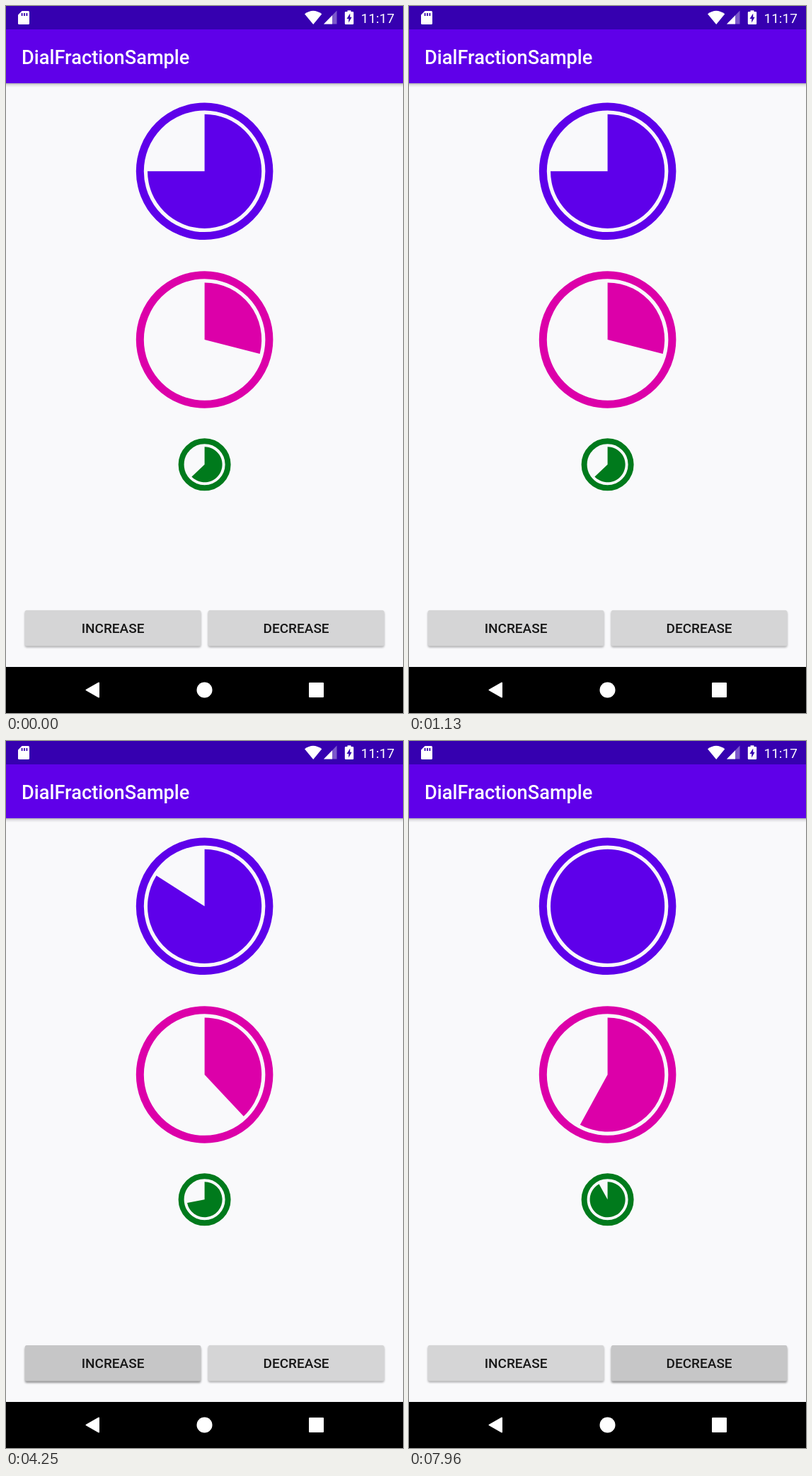
Write an HTML page that moves like this. It is 561 px wide and 998 px high and loops after 8 s.

```html
<!DOCTYPE html>
<html lang="en">
<head>
<meta charset="utf-8">
<title>Pie progress</title>
<style>
  html, body { margin: 0; width: 100%; height: 100%; overflow: hidden; background: #f9f9fb; }
  svg { display: block; width: 561px; height: 998px; }
  text { font-family: Roboto, sans-serif; font-weight: 500; }
  .label { font-size: 19px; fill: #171717; text-anchor: middle; }
</style>
</head>
<body>
<svg viewBox="0 0 561 998">
  <defs>
    <linearGradient id="shade" x2="0" y2="1">
      <stop offset="0" stop-color="#000" stop-opacity=".3"/>
      <stop offset=".4" stop-color="#000" stop-opacity=".1"/>
      <stop offset="1" stop-color="#000" stop-opacity="0"/>
    </linearGradient>
    <filter id="blur" x="-5%" y="-20%" width="110%" height="150%">
      <feGaussianBlur stdDeviation="1.6"/>
    </filter>
  </defs>

  <rect width="561" height="998" fill="#f9f9fb"/>
  <rect y="109" width="561" height="6" fill="url(#shade)"/>
  <rect y="32" width="561" height="77" fill="#5f00e9"/>
  <rect width="561" height="33" fill="#3600b0"/>
  <text x="22" y="81.5" font-size="27.2" fill="#fff">DialFractionSample</text>

  <g id="status" fill="#fff">
    <path d="M22.5 7H31.5Q33 7 33 8.500V24.500Q33 26 31.500 26H18.500Q17 26 17 24.500V12.500Z"/>
    <path d="M22.600 10v4M26 10v4M29.400 10v4" stroke="#3600b0" stroke-width="1.800"/>
    <path d="M422 11.300Q434 2.300 446.300 11.300L434.200 26Z"/>
    <path d="M449 25.500L467.500 6.500V25.500Z" opacity=".35"/>
    <path d="M449 25.500L461 13.200V25.500Z"/>
    <path d="M482.500 8V6.200H487.500V8H490Q491.200 8 491.200 9.200V24.800Q491.200 26 490 26H480Q478.800 26 478.800 24.800V9.200Q478.800 8 480 8Z"/>
    <path d="M486.200 10.500L481.500 18H484.200V23.500L488.600 15.800H486.200Z" fill="#3600b0"/>
    <text x="501.500" y="24" font-size="19" style="font-weight:400">11:17</text>
  </g>

  <g id="pies"></g>
  <g id="buttons"></g>

  <rect y="933" width="561" height="65"/>
  <g fill="#fff" stroke="#fff" stroke-linejoin="round">
    <path d="M113.500 965.500L131 955.500V975.500Z" stroke-width="2"/>
    <circle cx="280.500" cy="965.500" r="11" stroke="none"/>
    <rect x="429" y="956" width="19" height="19" stroke-width="2"/>
  </g>
</svg>
<script>
const LOOP = 8000;
const CX = 280.6;

// Time in ms and number of steps added to every pie.
const COUNT = [[0, 0], [2830, 0], [2960, 1], [4420, 11], [5080, 19], [5290, 19],
  [5420, 20], [6080, 20], [6250, 21], [7630, 30], [7955, 30], [7960, 29], [LOOP, 29]];
const INC_PRESS = [[0, 0], [2630, 0], [2830, 1], [4420, 1], [5080, 0], [5600, 0],
  [5710, 1], [6080, 1], [6710, 0], [LOOP, 0]];
const DEC_PRESS = [[0, 0], [7700, 0], [7960, 1], [LOOP, 1]];

function add(parent, tag, attrs) {
  const el = document.createElementNS('http://www.w3.org/2000/svg', tag);
  for (const key in attrs) el.setAttribute(key, attrs[key]);
  return parent.appendChild(el);
}

function valueAt(keys, t) {
  const i = keys.findIndex(k => k[0] > t);
  const [t0, v0] = keys[i - 1];
  const [t1, v1] = keys[i];
  return v0 + (v1 - v0) * (t - t0) / (t1 - t0);
}

function makePie(cy, color, ringR, ringW, r, start) {
  const group = document.getElementById('pies');
  add(group, 'circle', { cx: CX, cy, r: ringR, fill: 'none', stroke: color, 'stroke-width': ringW });
  const slice = add(group, 'path', { fill: color });
  return steps => {
    const part = Math.min(start + steps, 100) / 100;
    const a = Math.min(part, 0.99999) * 2 * Math.PI;
    const x = CX + r * Math.sin(a);
    const y = cy - r * Math.cos(a);
    slice.setAttribute('d',
      `M${CX} ${cy}V${cy - r}A${r} ${r} 0 ${part > 0.5 ? 1 : 0} 1 ${x} ${y}Z`);
  };
}

function makeButton(x, label, keys) {
  const group = document.getElementById('buttons');
  const box = { x, y: 853, width: 248.5, height: 50.5, rx: 2.5 };
  const shadow = add(group, 'rect', { ...box, filter: 'url(#blur)' });
  add(group, 'rect', { ...box, fill: '#d5d5d6' });
  const tint = add(group, 'rect', box);
  add(group, 'text', { x: x + 124.3, y: 885.3, class: 'label' }).textContent = label;
  return t => {
    const press = valueAt(keys, t);
    tint.setAttribute('opacity', 0.07 * press);
    shadow.setAttribute('opacity', 0.32 + 0.08 * press);
    shadow.setAttribute('y', 854.7 + 0.8 * press);
  };
}

const pies = [
  makePie(233.3, '#5e00ea', 91.3, 11, 80.6, 75),
  makePie(471, '#dc00a9', 91.3, 11, 80.6, 29),
  makePie(647.3, '#007a1c', 33, 8, 25, 63)
];
const buttons = [
  makeButton(26.8, 'INCREASE', INC_PRESS),
  makeButton(285.8, 'DECREASE', DEC_PRESS)
];

const began = performance.now();
function draw() {
  const t = Math.max(0, performance.now() - began) % LOOP;
  const steps = Math.floor(valueAt(COUNT, t) + 0.001);
  pies.forEach(show => show(steps));
  buttons.forEach(show => show(t));
  requestAnimationFrame(draw);
}
draw();
</script>
</body>
</html>
```
